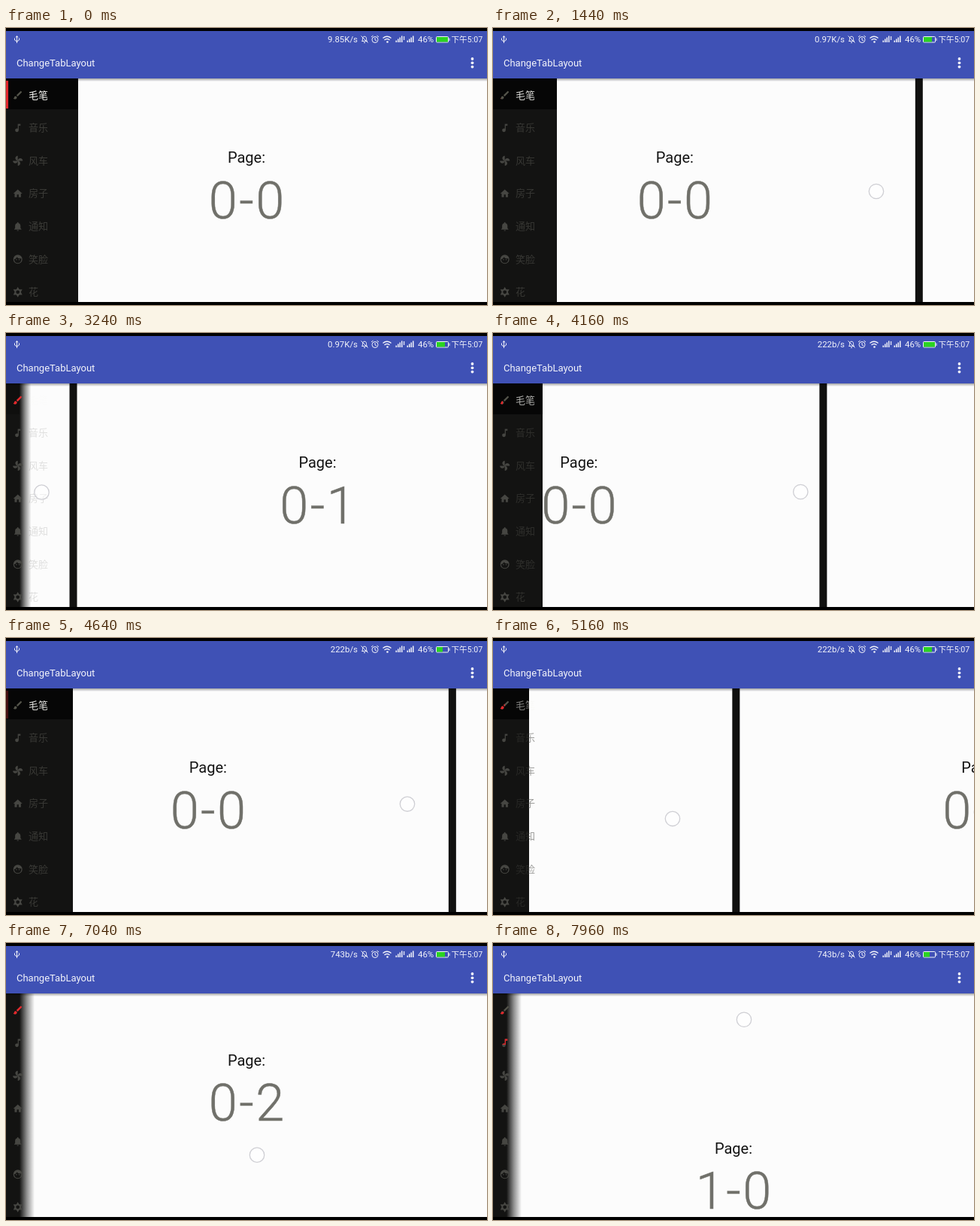
Recreate the animation shown at these times as an HTML page. Size 640 by 368 pixels, loop 8 s.

```html
<!DOCTYPE html>
<html lang="zh">
<head>
<meta charset="utf-8">
<title>ChangeTabLayout</title>
<style>
html, body { margin: 0; width: 100%; height: 100%; overflow: hidden; background: #000; }
svg { display: block; width: 100%; height: 100%; }
text { font-family: Roboto, "Noto Sans CJK SC", "Noto Sans CJK", sans-serif; }
.num { font-size: 68.5px; font-weight: 300; letter-spacing: 2.4px; fill: #70706a; stroke: #70706a; stroke-width: .5px; text-anchor: middle; }
.cap { font-size: 20px; font-weight: 400; fill: #141414; text-anchor: middle; }
.bar { font-size: 11.4px; fill: #f2f3fa; }
.tab { font-size: 13px; }
</style>
</head>
<body>
<svg viewBox="0 0 640 368">
  <defs>
    <clipPath id="body"><rect x="0" y="67" width="640" height="297"/></clipPath>
    <clipPath id="cut0"><rect id="cutBrush" x="8"/></clipPath>
    <clipPath id="cut1"><rect id="cutNote" x="8" y="125" width="15"/></clipPath>
    <linearGradient id="fade">
      <stop offset="0" stop-color="#131312"/>
      <stop offset=".5" stop-color="#131312" stop-opacity=".45"/>
      <stop offset="1" stop-color="#131312" stop-opacity="0"/>
    </linearGradient>
    <linearGradient id="drop" x2="0" y2="1">
      <stop offset="0" stop-opacity=".35"/>
      <stop offset="1" stop-opacity="0"/>
    </linearGradient>
  </defs>
  <rect width="640" height="368"/>
  <g clip-path="url(#body)">
    <rect y="67" width="640" height="297" fill="#fcfcfc"/>
    <g id="pages"></g>
    <rect id="panel" y="67" height="297" fill="#131312"/>
    <rect id="soft" y="67" height="297" fill="url(#fade)"/>
    <rect id="mark" y="67" height="41" fill="#060606"/>
    <rect id="strip" y="70" width="3" height="37" fill="#e0262a"/>
    <g id="tabs"></g>
    <circle id="finger" r="9.7" fill="#fff" fill-opacity=".5" stroke="#cfcfd4" stroke-width="1.3"/>
    <rect y="67" width="640" height="4" fill="url(#drop)"/>
  </g>
  <rect y="4" width="640" height="63" fill="#3f51b5"/>
  <g fill="none" stroke="#f2f3fa" stroke-width="1">
    <path d="M14.500 11v9M11.500 13.500v2.500l3 2 3-2v-2.500M13 12.500l1.500-2 1.500 2"/>
    <path d="M473.500 17.500h7c-1-1-1-2-1-4 0-3-5-3-5 0 0 2 0 3-1 4zM476 19.500h2M472.500 10.500l9 9"/>
    <circle cx="491" cy="15.500" r="4"/>
    <path d="M491 13v2.800l2 1M486 12l2.500-2M496 12l-2.500-2"/>
    <path d="M501.500 13.500q5.500-4.500 11 0M503.500 16q3.500-3 7 0" stroke-width="1.4"/>
    <rect x="572.500" y="11.500" width="16" height="7.500" rx="1"/>
    <path d="M590 13.500v3.500"/>
  </g>
  <g fill="#f2f3fa">
    <circle cx="507.500" cy="18.500" r="1.300"/>
    <g id="signal"></g>
    <circle cx="620.500" cy="41" r="1.900"/>
    <circle cx="620.500" cy="46.300" r="1.900"/>
    <circle cx="620.500" cy="51.600" r="1.900"/>
  </g>
  <rect id="charge" x="573" y="12" height="6.500" fill="#2bd322"/>
  <text id="speed" class="bar" x="468" y="19" text-anchor="end"></text>
  <text class="bar" x="548" y="19">46%</text>
  <text class="bar" x="592.500" y="19" style="font-size:10.600px">下午5:07</text>
  <text x="14" y="50.500" font-size="13" fill="#f2f3fa">ChangeTabLayout</text>
</svg>
<script>
const LOOP = 8000, STEP = 650, PAGE_H = 297, ROW = 43.6;
const $ = id => document.getElementById(id);
const clamp = x => Math.max(0, Math.min(1, x));
const set = (el, attrs) => { for (const k in attrs) el.setAttribute(k, attrs[k]); };

function add(parent, tag, attrs, text) {
  const el = document.createElementNS('http://www.w3.org/2000/svg', tag);
  set(el, attrs);
  if (text) el.textContent = text;
  parent.appendChild(el);
  return el;
}

// Smooth monotone curve through [time, value] points.
function curve(keys) {
  const slope = i => (keys[i + 1][1] - keys[i][1]) / (keys[i + 1][0] - keys[i][0]);
  const tan = keys.map((k, i) => {
    if (!i || i === keys.length - 1) return 0;
    const a = slope(i - 1), b = slope(i);
    return a * b <= 0 ? 0 : 2 * a * b / (a + b);
  });
  return t => {
    const last = keys.length - 1;
    if (t <= keys[0][0]) return keys[0][1];
    if (t >= keys[last][0]) return keys[last][1];
    let i = 0;
    while (t > keys[i + 1][0]) i++;
    const h = keys[i + 1][0] - keys[i][0], u = (t - keys[i][0]) / h, w = 1 - u;
    return keys[i][1] * (1 + 2 * u) * w * w + tan[i] * h * u * w * w
      + keys[i + 1][1] * u * u * (3 - 2 * u) - tan[i + 1] * h * u * u * w;
  };
}

const scrollX = curve([[800, 0], [1440, 78], [2360, 272], [3160, 560], [4160, 206], [4620, 50],
  [4920, 180], [5160, 321], [5400, 500], [5660, 650], [5860, 650], [6160, 863], [6340, 1030], [6640, 1300]]);
const scrollY = curve([[6840, 0], [7200, 40], [7960, 196], [8040, 220]]);
const fingerY = curve([[760, 220], [1440, 217], [2360, 213], [4160, 211], [5160, 240], [5400, 250]]);

const ICONS = [
  'M7 14c-1.660 0-3 1.340-3 3 0 1.310-1.160 2-2 2 .92 1.220 2.490 2 4 2 2.210 0 4-1.790 4-4 0-1.660-1.340-3-3-3zM20.700 4.600l-1.300-1.300c-.4-.4-1-.4-1.400 0L9 12.250 11.750 15l9-9c.4-.4.4-1 0-1.400z',
  'M12 3v10.550c-.6-.34-1.270-.55-2-.55a4 4 0 1 0 4 4V7h4V3z',
  'M12 12c0-3 2.500-5.500 5.500-5.500S23 9 23 12zc0 3-2.500 5.500-5.500 5.500S1 15 1 12zc-3 0-5.500-2.500-5.500-5.500S9 1 12 1zc3 0 5.500 2.500 5.500 5.500S15 23 12 23z',
  'M10 20v-6h4v6h5v-8h3L12 3 2 12h3v8z',
  'M12 22a2 2 0 0 0 2-2h-4a2 2 0 0 0 2 2zM18 16v-5c0-3-1.600-5.600-4.500-6.300V4a1.500 1.500 0 0 0-3 0v.7C7.600 5.400 6 8 6 11v5l-2 2v1h16v-1z',
  'M12 2a10 10 0 1 0 0 20 10 10 0 0 0 0-20zM4 12c3-.5 5-2.500 6-5 2.500 3 5.500 4 9.700 3.500A8 8 0 1 1 4 12zM7.700 13a1.300 1.300 0 1 0 2.600 0 1.300 1.300 0 0 0-2.600 0zM13.700 13a1.300 1.300 0 1 0 2.600 0 1.300 1.300 0 0 0-2.600 0z',
  'M12 .5l3.300 5.500H22l-3.200 6L22 18h-6.700L12 23.500 8.700 18H2l3.200-6L2 6h6.700zM12 8a4 4 0 1 0 0 8 4 4 0 0 0 0-8z'
];
const NAMES = ['毛笔', '音乐', '风车', '房子', '通知', '笑脸', '花'];

function icon(i, fill, parent) {
  return add(parent, 'path', { d: ICONS[i], fill, 'fill-rule': 'evenodd',
    transform: `translate(8.500 ${82 + i * ROW}) scale(.6)` });
}

const labels = NAMES.map((name, i) => {
  icon(i, i ? '#464642' : '#54544a', $('tabs'));
  return add($('tabs'), 'text', { class: 'tab', x: 30, y: 93.6 + i * ROW, fill: i ? '#3c3c38' : '#f6f6f2' }, name);
});
for (const i of [0, 1]) {
  icon(i, '#e8262a', add($('tabs'), 'g', { 'clip-path': `url(#cut${i})` }));
}

function page(name) {
  const g = add($('pages'), 'g', {});
  add(g, 'text', { class: 'cap', x: 320, y: 179 }, 'Page:');
  add(g, 'text', { class: 'num', x: 321.2, y: 252.5 }, name);
  return g;
}
const row0 = [0, 1, 2].map(k => {
  const g = page('0-' + k);
  add(g, 'rect', { x: 640, y: 67, width: 10, height: PAGE_H, fill: '#111110' });
  return g;
});
const row1 = page('1-0');

for (const x of [518.5, 533.5]) {
  for (let i = 0; i < 4; i++) {
    const h = 2.5 + i * 2;
    add($('signal'), 'rect', { x: x + i * 2.5, y: 19 - h, width: 1.5, height: h });
  }
}
add($('signal'), 'rect', { x: 529, y: 11, width: 1.2, height: 5 });

function touch(t) {
  const s = scrollX(t + 50);
  if (t >= 760 && t < 5400) return [596 - s, fingerY(t)];
  if (t >= 5840 && t < 6320) return [253 + scrollX(6210) - s, 282];
  if (t >= 6760) return [334, 298 - scrollY(t)];
  return null;
}

function draw(t) {
  const s = scrollX(t), v = scrollY(t);
  const p = clamp(s / STEP), q = clamp(v / PAGE_H);
  const w = Math.max(18, Math.round(96.4 - s * 0.149));

  row0.forEach((g, k) => set(g, { transform: `translate(${k * STEP - s} ${-v})` }));
  set(row1, { transform: `translate(0 ${PAGE_H - v})` });

  set($('panel'), { width: w });
  set($('soft'), { x: w, width: 20 * clamp((p - 0.7) / 0.2) });
  set($('mark'), { width: w, opacity: clamp(2 - 2 * p) });
  set($('strip'), { opacity: clamp(1 - p * 9) });
  labels.forEach(el => set(el, { opacity: 1 - p }));

  set($('cutBrush'), { y: 82 + 14.4 * q, width: p < 1 ? 0.5 + 14.4 * p : 16, height: 14.4 * (1 - q) });
  set($('cutNote'), { height: 14.4 * q + 0.6 * clamp(q * 9) });

  const at = touch(t);
  set($('finger'), { visibility: at ? 'visible' : 'hidden' });
  if (at) set($('finger'), { cx: at[0], cy: at[1] });

  const phase = t % 1800;
  set($('charge'), { width: phase < 650 ? 15 : phase < 1250 ? 8 : 11 });
  $('speed').textContent = t < 760 ? '9.85K/s' : t < 3760 ? '0.97K/s' : t < 6760 ? '222b/s' : '743b/s';
}

const start = performance.now();
function tick() {
  draw((performance.now() - start) % LOOP);
  requestAnimationFrame(tick);
}
draw(0);
requestAnimationFrame(tick);
</script>
</body>
</html>
```
